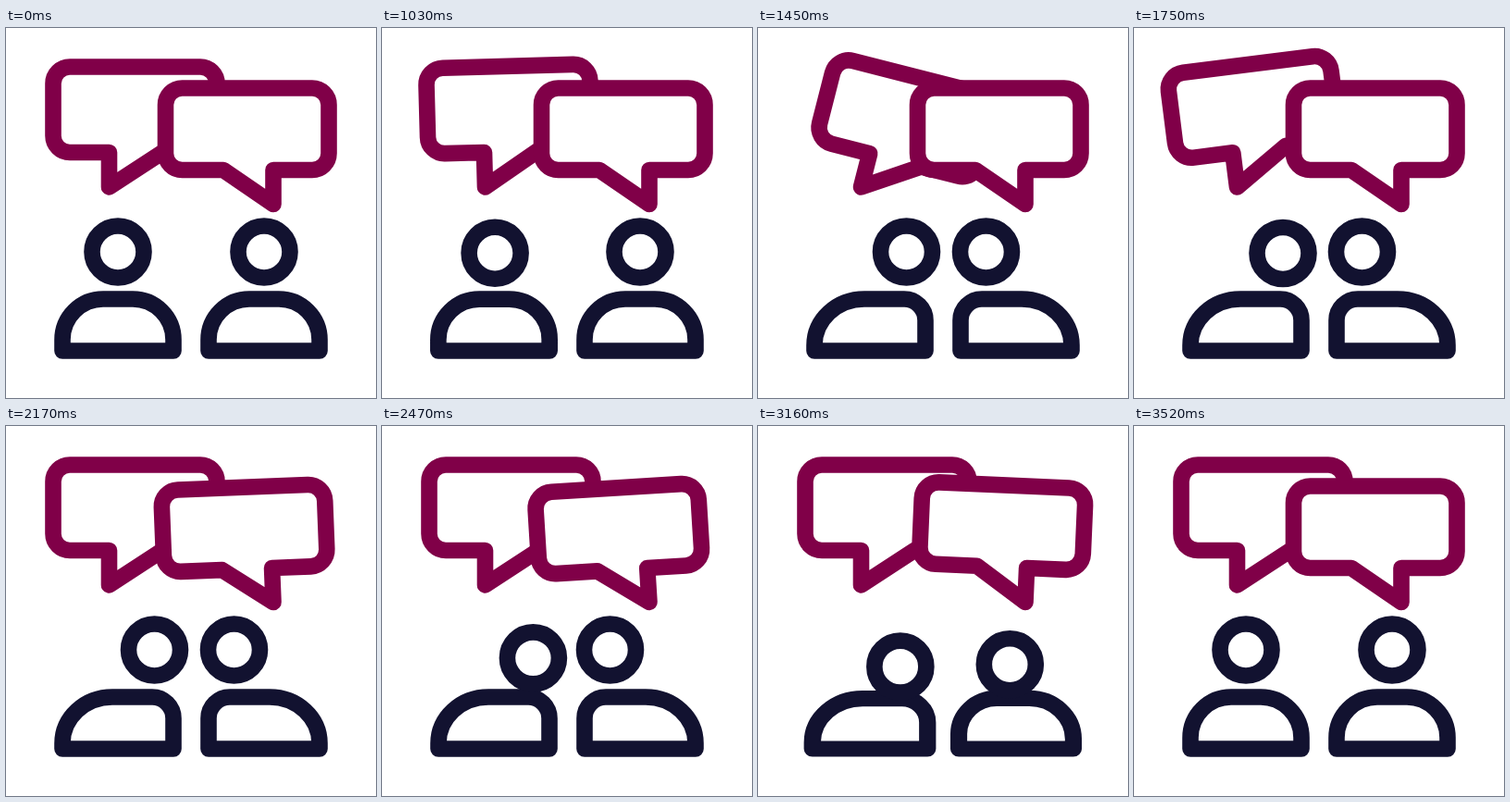
Recreate the animation shown at these times as an HTML page. Size 400 by 400 pixels, loop 3.55 s.

```html
<!DOCTYPE html>
<html lang="en">
<head>
<meta charset="utf-8">
<title>Conversation</title>
<style>
  html, body { margin: 0; height: 100%; overflow: hidden; background: #fff; }
  svg { display: block; width: 100vw; height: 100vh; }
  path, circle { fill: none; stroke: #121230; stroke-width: 17.6; stroke-linejoin: round; }
  .bubble { fill: #fff; stroke: #800048; }
</style>
</head>
<body>
<svg viewBox="0 0 400 400">
  <path class="bubble" id="bubbleL" d="M69 42H210a18 18 0 0 1 18 18V116.500a18 18 0 0 1-18 18H169L111.500 172V134.500H69a18 18 0 0 1-18-18V60a18 18 0 0 1 18-18Z"/>
  <path class="bubble" id="bubbleR" d="M190.500 65H331a18 18 0 0 1 18 18V135.500a18 18 0 0 1-18 18H289V190.500L235 153.500H190.500a18 18 0 0 1-18-18V83a18 18 0 0 1 18-18Z"/>
  <g transform="translate(121)"><path id="bodyL"/><circle id="headL" r="28"/></g>
  <g transform="translate(279) scale(-1 1)"><path id="bodyR"/><circle id="headR" r="28"/></g>
</svg>
<script>
const LOOP = 3550, STEP = 30, START = 1030;
const SWING = 235, NOD = 243;
const $ = id => document.getElementById(id);
const mix = (a, b, p) => a + (b - a) * p;

// Smooth 0..1 progress over a time span
function ease(t, from, length) {
  const p = Math.min(1, Math.max(0, (t - from) / length));
  return p * p * (3 - 2 * p);
}

// Smooth path through evenly spaced values
const through = (values, t, from, gap) => values.slice(1).reduce(
  (v, next, i) => v + (next - values[i]) * ease(t, from + i * gap, gap), values[0]);

function swing(id, t, from, pivot) {
  const angle = through([0, -20, 14.5, -9, 4, 0], t, from, SWING);
  $(id).setAttribute("transform", `rotate(${angle} ${pivot})`);
}

// Each person leans inwards and back, ducking midway
function person(side, t, reach, lean, back, nod) {
  const p = ease(t, lean, 400) - ease(t, back + 25, 480);
  const duck = through([0, 1, 0], t, lean + 15, 200) + through([0, 1, 0], t, back, 250);
  const rx = mix(44, 54, p), ry = mix(44, 50, p), r = mix(44, 23, p);
  const body = $("body" + side), head = $("head" + side);
  body.setAttribute("d", `M-60 349V${293 + ry}A${rx} ${ry} 0 0 1 ${rx - 60} 293H${60 - r}A${r} ${r} 0 0 1 60 ${293 + r}V349Z`);
  body.setAttribute("transform", `translate(0 349) scale(${1 + 0.058 * duck} ${1 - 0.045 * duck}) translate(0 -349)`);
  head.setAttribute("cx", reach * p + 3.3 * nod);
  head.setAttribute("cy", 242 + 28 * duck + 10 * nod);
}

function draw(now) {
  let t = Math.floor((now % LOOP - 10) / STEP) * STEP + 10;
  if (t < START) t = 0;
  swing("bubbleL", t, 990, "111.5 172");
  swing("bubbleR", t, 2121, "289 190.5");
  person("L", t, 39.5, 990, 3010, through([0, 1, 0, 1, 0], t, 1690, NOD));
  person("R", t, 32.5, 1030, 2795, 0);
}

const begin = performance.now();
function tick() {
  draw(performance.now() - begin);
  requestAnimationFrame(tick);
}
tick();
</script>
</body>
</html>
```
